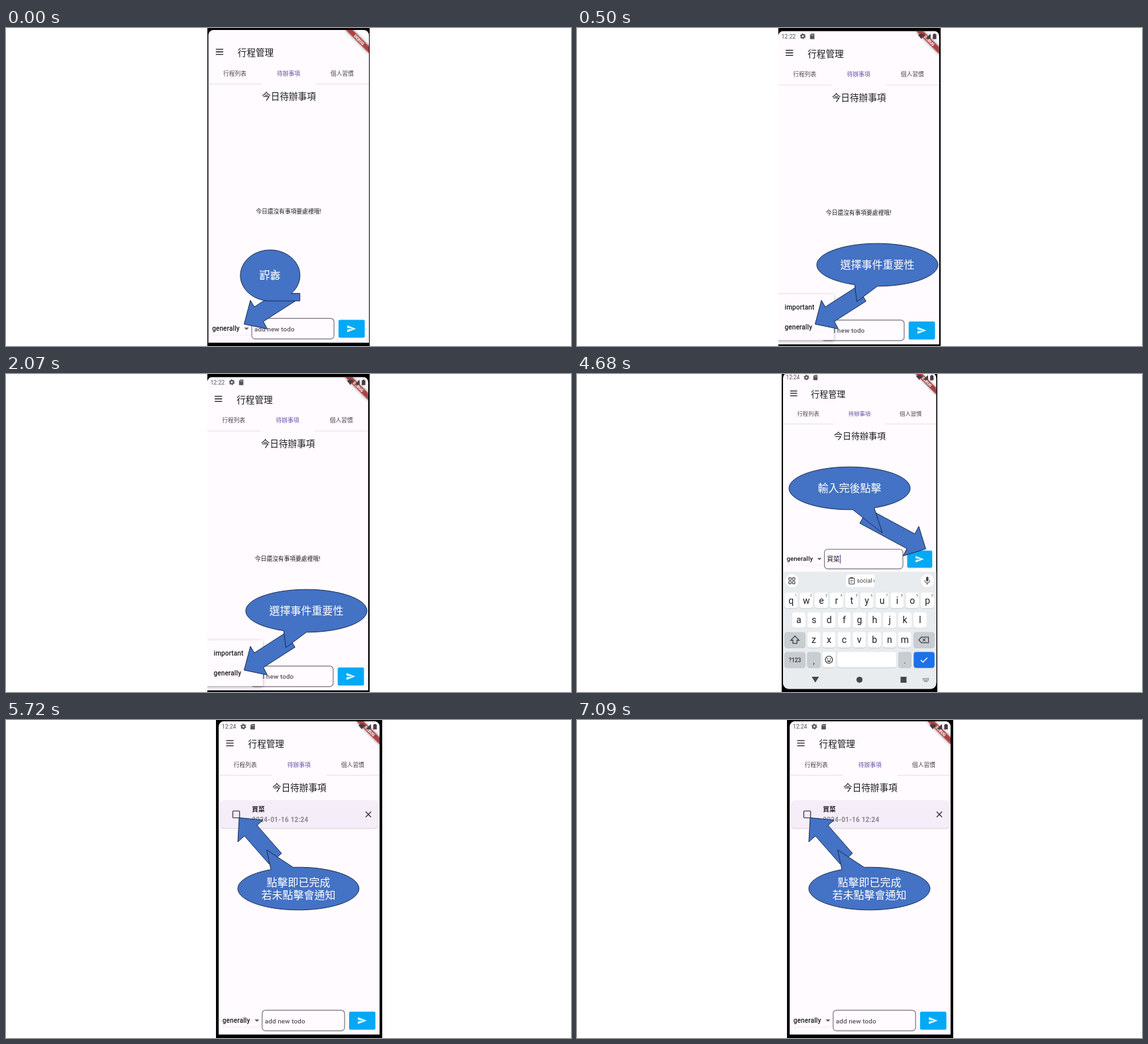
Write an HTML page that moves like this. It is 853 px wide and 480 px high and loops after 8000 ms.

```html
<!DOCTYPE html>
<html lang="zh-Hant">
<head>
<meta charset="utf-8">
<title>Todo walkthrough</title>
<style>
html, body { margin: 0; width: 100%; height: 100%; overflow: hidden; background: #fff; }
svg { display: block; width: 853px; height: 480px; }
text { font-family: Roboto, "Noto Sans CJK TC", "Noto Sans CJK", sans-serif; white-space: pre; }
.shape { fill: #4472c4; stroke: #172c51; stroke-width: 1; stroke-linejoin: miter; }
.line { fill: none; stroke: #444; stroke-width: 1.3; }
</style>
</head>
<body>
<svg id="stage" viewBox="0 0 853 480">
  <defs>
    <clipPath id="open"><path d="M305.5 520V11a8 8 0 0 1 8-8H540a8 8 0 0 1 8 8V475H305.5z"/></clipPath>
    <clipPath id="full"><rect x="305.5" y="3" width="242.5" height="500" rx="9"/></clipPath>
    <clipPath id="phone"><rect x="304" y="0" width="243.5" height="478"/></clipPath>
    <clipPath id="chip"><rect x="406" y="302" width="43" height="20"/></clipPath>
    <filter id="blur" x="-30%" y="-80%" width="160%" height="260%"><feGaussianBlur stdDeviation="1.9"/></filter>
    <filter id="lift" x="-20%" y="-20%" width="140%" height="150%"><feDropShadow dx="0" dy="1.5" stdDeviation="2.5" flood-opacity=".35"/></filter>
    <filter id="low" x="-5%" y="-10%" width="110%" height="130%"><feDropShadow dx="0" dy=".8" stdDeviation=".6" flood-opacity=".3"/></filter>
  </defs>
</svg>
<script>
const INK = '#1c1b1f', GREY = '#49454f', PAPER = '#fffbff';
const KEY_BG = '#e8ecef', KEY_GREY = '#c8cdd2';

const text = (x, y, s, size, fill = INK, more = '') =>
  `<text x="${x}" y="${y}" font-size="${size}" fill="${fill}" ${more}>${s}</text>`;
const mid = (x, y, s, size, fill, more = '') =>
  text(x, y + size * 0.37, s, size, fill, 'text-anchor="middle" ' + more);
const box = (x, y, w, h, r, fill, more = '') =>
  `<rect x="${x}" y="${y}" width="${w}" height="${h}" rx="${r}" fill="${fill}" ${more}/>`;
const path = (d, fill, more = '') => `<path d="${d}" fill="${fill}" ${more}/>`;
const line = (d, more = '') => `<path class="line" d="${d}" ${more}/>`;
const dot = (x, y, r, fill) => `<circle cx="${x}" cy="${y}" r="${r}" fill="${fill}"/>`;
const arrow = points => `<polygon class="shape" points="${points}"/>`;
const bold = 'font-weight="500" letter-spacing=".1"';

// Oval speech bubble: the outline runs from a the long way round to b, then to the tip.
const bubble = (cx, cy, rx, ry, a, b, tip, lines) => {
  const rim = deg => {
    const t = deg * Math.PI / 180;
    return `${cx + rx * Math.cos(t)} ${cy + ry * Math.sin(t)}`;
  };
  return `<path class="shape" d="M${rim(a)}A${rx} ${ry} 0 1 1 ${rim(b)}L${tip}z"/>` +
    lines.map((s, i) => mid(cx, cy + (i - (lines.length - 1) / 2) * 19.5, s, 16, '#fff', 'font-weight="300"')).join('');
};

const ribbon = () => `<g transform="translate(548 3) rotate(45)">
  ${box(-25, 17.3, 50, 7.4, 0, '#000', 'opacity=".5" filter="url(#blur)"')}
  ${box(-25, 17.3, 50, 7.4, 0, '#b71c1c', 'opacity=".66"')}
  ${mid(0, 21, 'DEBUG', 6.1, '#fff', 'font-weight="900"')}</g>`;

const status = clock => {
  const c = '#565359';
  return text(310.2, 14.2, clock, 8.7, c) +
    `<circle cx="342.6" cy="11" r="2.4" fill="none" stroke="${c}" stroke-width="2"/>` +
    `<circle cx="342.6" cy="11" r="3.7" fill="none" stroke="${c}" stroke-width="1.2" stroke-dasharray="1.9 1.975"/>` +
    path('M355.2 7H360V15.2H353.4V9z', c) +
    path('M355.6 8.4v1.6M357 8.4v1.6M358.4 8.4v1.6', 'none', 'stroke="#fff" stroke-width=".6"') +
    path('M516 8.8Q521 5.4 526 8.8L521 15z', '#4a3a40') +
    path('M535 7V15H527z', '#4a3a40') +
    path('M539.7 7h2.6v1h1.4v7.4h-5.4V8h1.4z', '#4a3a40');
};

const field = (dy, value) => `<g transform="translate(0 ${dy})">
  ${text(311.2, 457, 'generally', 10, INK, bold)}
  ${path('M311 463.5H369', 'none', 'stroke="#e9e5ea" stroke-width=".7"')}
  ${path('M359.6 452.2h7l-3.5 3.5z', '#5f5c62')}
  ${box(371, 438.3, 124.2, 31, 5, 'none', 'stroke="#79747e" stroke-width="1.2"')}
  ${value
    ? text(374.8, 457.6, value, 10.2) + box(395.5, 447, 1.2, 14, 0, '#6750a4')
    : text(375, 457.8, 'add new todo', 9.9, '#5a565e', bold)}
  ${box(502, 440.4, 39.6, 27.2, 2, '#03a9f4')}
  ${path('M515.2 448.7L528.6 454L515.2 459.3V455.3L524 454L515.2 452.7z', '#e6f5fe')}</g>`;

// The app page shared by all scenes, in its own coordinates.
const page = ({ fit, clip = 'open', clock, dy = 0, value, empty, extra = '' }) =>
  `<g transform="matrix(${fit[0]} 0 0 ${fit[0]} ${fit[1]} ${fit[2]})"><g clip-path="url(#${clip})">
  ${box(305, 0, 244, 520, 0, PAPER)}
  ${path('M316.8 32.2h11.2M316.8 36h11.2M316.8 39.8h11.2', 'none', `stroke="${INK}" stroke-width="1.3"`)}
  ${mid(377, 37, '行程管理', 13.6)}
  ${mid(345.5, 68.3, '行程列表', 8.75, GREY)}
  ${mid(426.5, 68.3, '待辦事項', 8.75, '#6750a4')}
  ${mid(507.5, 68.3, '個人習慣', 8.75, GREY)}
  ${path('M305.5 84.5H386M467.5 84.5H548', 'none', 'stroke="#e7e0ec" stroke-width="1"')}
  ${mid(427, 103.3, '今日待辦事項', 13.6)}
  ${empty ? mid(426.5, 277, '今日還沒有事項要處裡哦!', 8.75) : ''}
  ${field(dy, value)}${ribbon()}${clock ? status(clock) : ''}</g></g>${extra}`;

const bezel = (x, w) => box(x, 0, w, 480, 0, '#000');

const keyboard = () => {
  const pitch = 22.87;
  const cap = (x, y, w, fill) => box(x, y + 0.7, w, 23.6, 4, '#b9bec3') + box(x, y, w, 23.6, 4, fill);
  const row = (letters, x0, y, digits) => [...letters].map((ch, i) => {
    const x = x0 + i * pitch;
    return cap(x - 10, y, 20, '#fff') + text(x, y + 16.6, ch, 14, '#202124', 'text-anchor="middle"') +
      (digits ? text(x + 7.2, y + 6.2, (i + 1) % 10, 5.6, '#5f6368', 'text-anchor="middle"') : '');
  }).join('');
  const grid = [[319.8, 307.6], [325.4, 307.6], [319.8, 313], [325.4, 313]]
    .map(([x, y]) => box(x, y, 3.6, 3.6, 0.6, 'none', 'stroke="#444" stroke-width="1.1"')).join('');
  return path('M311.2 298.5H542.4V467a8.5 8.5 0 0 1-8.5 8.5H319.7a8.5 8.5 0 0 1-8.5-8.5z', KEY_BG) +
    dot(324.5, 312, 10, '#fff') + grid +
    box(406, 302.5, 48, 19, 4, '#fff', 'clip-path="url(#chip)"') +
    box(410.7, 308, 8, 9, 1, 'none', 'stroke="#444" stroke-width="1.1"') + box(412.7, 306.8, 4, 2.2, 0.5, '#444') +
    line('M412.6 311.5h4.2M412.6 314h3', 'style="stroke-width:.9"') +
    `<g clip-path="url(#chip)">${text(422.6, 315.2, 'social c', 8.7, '#444')}</g>` +
    dot(528.8, 312, 10, '#fff') + box(527, 306, 3.6, 7, 1.8, '#444') +
    line('M525 311.4a3.8 3.8 0 0 0 7.6 0M528.8 315.2V318', 'style="stroke-width:1.1"') +
    row('qwertyuiop', 323.3, 330, true) + row('asdfghjkl', 334.9, 359.8) + row('zxcvbnm', 357.6, 389.5) +
    cap(313.3, 389.5, 31.5, KEY_GREY) + line('M329 395.4L335.2 402H332V406.6H326V402H322.8z') +
    cap(508.3, 389.5, 31.5, KEY_GREY) + line('M520 397.2H530.6V405.6H520L516 401.4z') +
    line('M521.8 399.2l4.4 4.4M526.2 399.2l-4.4 4.4', 'style="stroke-width:1.1"') +
    cap(313.3, 419.5, 31.5, KEY_GREY) + mid(329, 431.5, '?123', 8.4, '#333', 'font-weight="500"') +
    cap(347.6, 419.5, 20, KEY_GREY) + mid(357.6, 432.4, ',', 13, '#333') +
    cap(370.4, 419.5, 20, '#fff') + '<circle class="line" cx="380.4" cy="431.3" r="5.4"/>' +
    dot(378.3, 430, 0.9, '#444') + dot(382.5, 430, 0.9, '#444') + path('M377.3 432.4h6.2a3.2 3.2 0 0 1-6.2 0z', '#444') +
    cap(393.2, 419.5, 89, '#fff') +
    cap(485, 419.5, 20, KEY_GREY) + mid(495, 432, '.', 13, '#333') +
    box(508.3, 419.5, 31.5, 24.2, 4, '#1a73e8') +
    path('M519 431.8l3.2 3.2 6.6-6.8', 'none', 'stroke="#fff" stroke-width="1.4"') +
    path('M354.3 457H365.3L359.8 465.8z', '#474747') + dot(426.5, 461.5, 4.6, '#474747') +
    box(488.5, 457, 9, 9, 0.5, '#474747') +
    path('M522 459.6h9.4M522 461.8h9.4', 'none', 'stroke="#555" stroke-width="1.2" stroke-dasharray="1.2 .8"') +
    path('M524 464h5.4', 'none', 'stroke="#555" stroke-width="1"');
};

const popup = () => `<g clip-path="url(#phone)">
  ${box(298, 402, 89.6, 69, 1.5, PAPER, 'filter="url(#lift)"')}
  ${text(313.5, 424.8, 'important', 10, INK, bold)}
  ${text(313.5, 454.8, 'generally', 10, INK, bold)}</g>`;

const card = () => box(323.2, 121.3, 239, 42, 6, '#f5eef8', 'filter="url(#low)"') +
  box(342.4, 137.4, 10.2, 10.2, 1, 'none', `stroke="${GREY}" stroke-width="1.4"`) +
  text(371.3, 137.9, '買菜', 9.6, INK, 'font-weight="700"') +
  text(371.3, 153.9, '2024-01-16 12:24', 10, '#8c888f', 'font-weight="700" letter-spacing=".2"') +
  path('M543 138.4l8.2 8.2M551.2 138.4l-8.2 8.2', 'none', `stroke="${INK}" stroke-width="1.3"`);

const downLeft = arrow('359.5,447 369,411 374.8,421 423,390 436.3,412.4 388.5,443 394.5,454.3');

const scenes = [
  { ms: 500, art: () => bezel(304, 245) + page({ fit: [1, 0, 0], empty: true }) + downLeft +
    '<path class="shape" d="M399 412A45 38.5 0 1 1 430.8 400.6H443.7V412z"/>' +
    `<g transform="translate(398.5 373) scale(1 -1)">${mid(0, 0, '點擊', 16, '#fff', 'font-weight="300"')}</g>` },
  { ms: 2610, art: () => bezel(304, 245) +
    page({ fit: [1.0025, -2.5, 1.4], clock: '12:22', empty: true, extra: popup() }) + downLeft +
    bubble(453.5, 357.5, 91.5, 32.3, 113, 90, '422.5 413', []).replace(/^.*$/,
      bubble(453.5, 357.5, 91.5, 32.3, 112, 90, '422.5 413', ['選擇事件重要性'])) },
  { ms: 2610, art: () => bezel(309, 235) +
    page({ fit: [0.954, 19.6, -5.2], clip: 'full', clock: '12:24', dy: -155.6, value: '買菜' }) + keyboard() +
    arrow('526.5,264 516,230 510,241.3 439,203 427,225.3 498,263.6 492.3,274.6') +
    bubble(411.5, 172.5, 91.5, 32.3, 87, 66, '461 240', ['輸入完後點擊']) },
  { ms: 2280, art: () => bezel(317, 251) +
    page({ fit: [1.002, 15, -1.1], clock: '12:24', extra: card() }) +
    arrow('352,147.5 388,151 379,159 416,201.3 397.3,217.5 360,175 350,184') +
    bubble(441.5, 254.5, 91.5, 32.3, 265, 243, '393.5 196', ['點擊即已完成', '若未點擊會通知']) }
];

const stage = document.getElementById('stage');
const groups = scenes.map(scene => {
  const g = document.createElementNS('http://www.w3.org/2000/svg', 'g');
  g.innerHTML = scene.art();
  stage.append(g);
  return g;
});
const total = scenes.reduce((sum, s) => sum + s.ms, 0);
const start = performance.now();

function show() {
  let t = (performance.now() - start) % total, now = 0;
  while (t >= scenes[now].ms) t -= scenes[now++].ms;
  groups.forEach((g, i) => g.setAttribute('display', i === now ? 'inline' : 'none'));
  requestAnimationFrame(show);
}
show();
</script>
</body>
</html>
```
